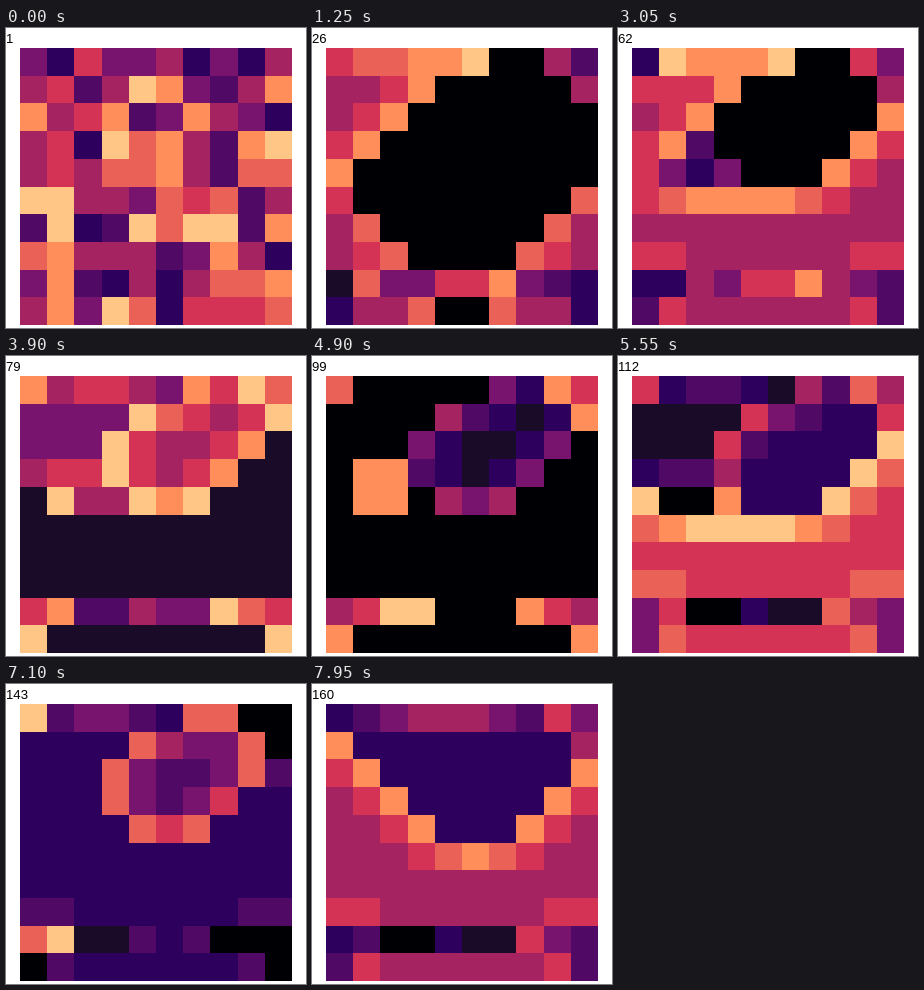
Write an HTML page with a canvas that moves like this. It is 300x300 px and loops after 8 s.

```html
<!DOCTYPE html>
<html lang="en">
<head>
<meta charset="utf-8">
<title>Flashing grid</title>
<style>
  html, body { margin: 0; width: 100%; height: 100%; overflow: hidden; background: #fff; }
  canvas { display: block; }
</style>
</head>
<body>
<canvas id="stage" width="300" height="300"></canvas>
<script>
const SIZE = 10, STEPS = 160, STEP_MS = 50;
const LEFT = 14, TOP = 20, CELL_W = 27.2, CELL_H = 27.7;
const COLORS = ['#000004', '#1a0b29', '#2d005e', '#500a66', '#78146e',
                '#a42360', '#d43355', '#ea6158', '#ff8e5b', '#ffc685'];
const START = `4738615556 6744423741 2812868827 8844365624 4546674266
               4518674278 7457237431 4524873247 3153341314 3721414667`;
// Rows are stacked bottom to top in text order: 1, 10, 2, 3 … 9.
const ROW_ORDER = [8, 7, 6, 5, 4, 3, 2, 1, 9, 0];

// Every cell gains 1; a cell passing 9 flashes once, boosting its neighbours, then resets to 0.
function advance(grid) {
  const next = grid.map(row => row.slice());
  const bump = (r, c) => {
    if (r < 0 || c < 0 || r >= SIZE || c >= SIZE) return;
    if (++next[r][c] !== 10) return;
    for (let dr = -1; dr <= 1; dr++)
      for (let dc = -1; dc <= 1; dc++)
        if (dr || dc) bump(r + dr, c + dc);
  };
  for (let r = 0; r < SIZE; r++)
    for (let c = 0; c < SIZE; c++) bump(r, c);
  return next.map(row => row.map(v => v > 9 ? 0 : v));
}

const states = [];
let grid = START.split(/\s+/).map(row => [...row].map(Number));
for (let i = 0; i < STEPS; i++) states.push(grid = advance(grid));

const ctx = document.getElementById('stage').getContext('2d');
const edgeX = i => Math.round(LEFT + i * CELL_W);
const edgeY = i => Math.round(TOP + i * CELL_H);

function draw(step) {
  ctx.fillStyle = '#fff';
  ctx.fillRect(0, 0, 300, 300);
  ctx.fillStyle = '#000';
  ctx.font = '13.2px "Liberation Sans", Arial, sans-serif';
  ctx.fillText(step + 1, 0, 15);
  ROW_ORDER.forEach((row, y) => states[step][row].forEach((value, x) => {
    ctx.fillStyle = COLORS[value];
    ctx.fillRect(edgeX(x), edgeY(y), edgeX(x + 1) - edgeX(x), edgeY(y + 1) - edgeY(y));
  }));
}

function tick() {
  draw(Math.floor(performance.now() / STEP_MS) % STEPS);
  requestAnimationFrame(tick);
}
tick();
</script>
</body>
</html>
```
